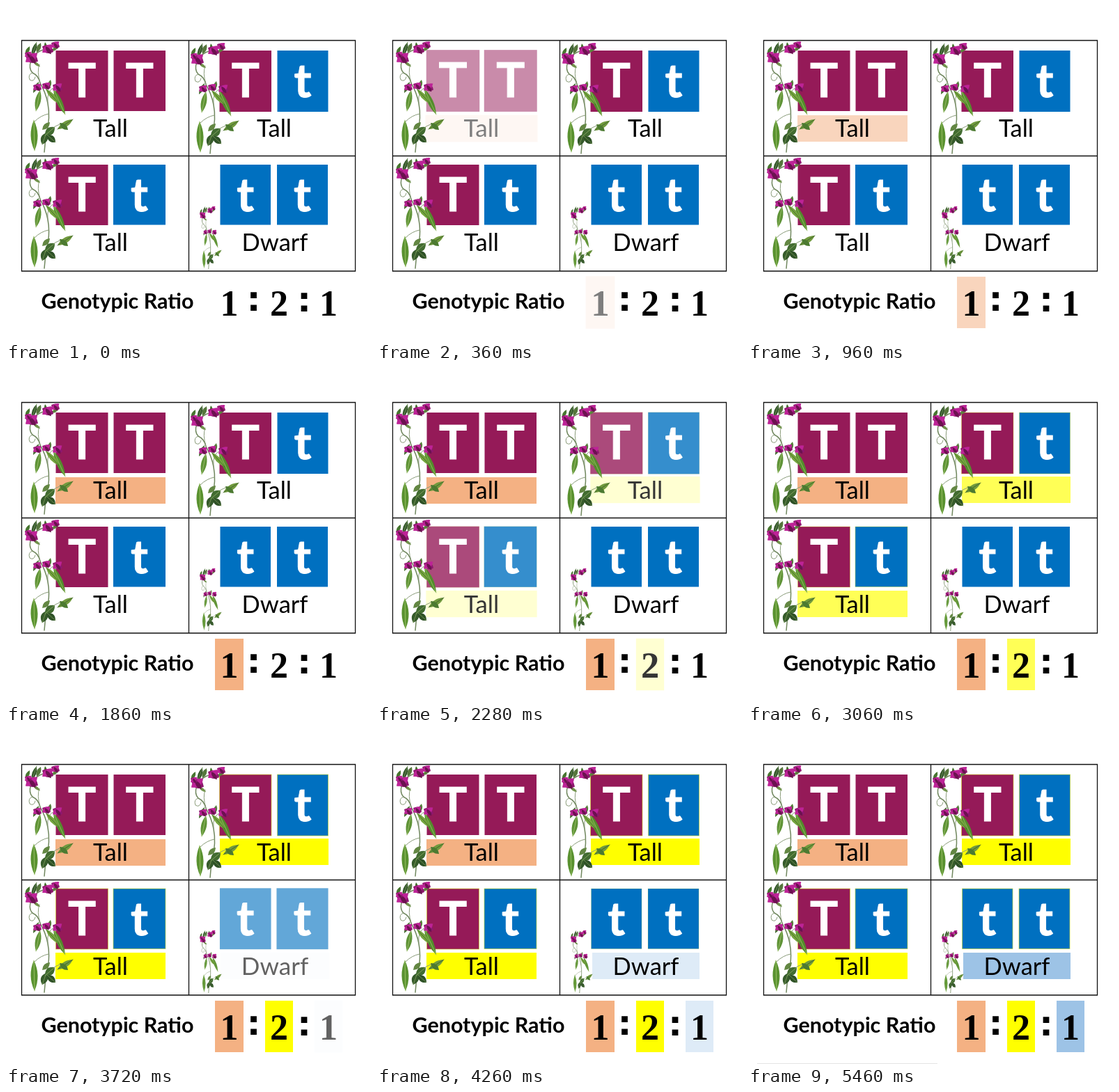
An HTML page that plays this animation: 524x480 px, repeating every 5.52 s.

```html
<!DOCTYPE html>
<html lang="en">
<head>
<meta charset="utf-8">
<title>Genotypic Ratio</title>
<style>
  html, body { margin: 0; width: 100%; height: 100%; overflow: hidden; background: #fff; }
  svg { display: block; width: 524px; height: 480px; }
  text { text-anchor: middle; }
  .allele { font: 700 67px Lato, sans-serif; fill: #fff; stroke: #fff; stroke-width: 1; }
  .trait { font: 400 34.5px Lato, sans-serif; }
  .title { font: 700 30.5px Lato, sans-serif; }
  .digit { font: 700 52px "Liberation Serif", serif; }
  .colon { font: 700 48px "Liberation Sans", sans-serif; stroke: #000; stroke-width: 2; }
</style>
</head>
<body>
<svg id="stage" viewBox="0 0 524 480">
  <path d="M22.5 49.5H501.5V381H22.5ZM262.5 49.5V381M22.5 215.5H501.5" fill="none" stroke="#111" stroke-width="1.3"/>
  <text class="title" x="160" y="435">Genotypic Ratio</text>
  <text class="colon" x="355.5" y="437">:</text>
  <text class="colon" x="428" y="438">:</text>
  <g id="parts"></g>
  <g id="plants"></g>
  <path id="rule" d="M13 479.5H272" stroke="#e4e4e4"/>
</svg>
<script>
const LOOP = 5520, STEP = 60, FADE = 1800, PULSE = 450;
const PURPLE = '#951a58', BLUE = '#0070c0';
const parts = document.getElementById('parts');
const plants = document.getElementById('plants');
const rule = document.getElementById('rule');

function add(parent, tag, attrs, content = '') {
  const el = document.createElementNS('http://www.w3.org/2000/svg', tag);
  for (const name in attrs) el.setAttribute(name, attrs[name]);
  el.textContent = content;
  return parent.appendChild(el);
}

// A box with centred text that can pulse as one piece.
function makePart([x, y, w, h], fill, cls, label, baseline) {
  const g = add(parts, 'g', {});
  const rect = add(g, 'rect', { x: -w / 2, y: -h / 2, width: w, height: h, fill });
  add(g, 'text', { class: cls, y: baseline - y - h / 2 }, label);
  return { g, rect, cx: x + w / 2, cy: y + h / 2 };
}

const tile = (box, label) =>
  makePart(box, label === 'T' ? PURPLE : BLUE, 'allele', label, box[1] + 66.5);

const groups = [
  { start: 0, color: '#f4b183', edge: 'none',
    tiles: [tile([71.5, 64, 75, 87], 'T'), tile([154.5, 64, 74.5, 87], 'T')],
    bands: [[[71, 157, 158, 38], 'trait', 'Tall', 188], [[300, 389, 41, 74], 'digit', '1', 445]] },
  { start: 1868, color: '#ffff00', edge: '#d4dc20',
    tiles: [tile([306.5, 64, 74.5, 88], 'T'), tile([389.5, 64, 73, 88], 't'),
            tile([71.5, 228, 75, 87], 'T'), tile([154, 228, 75, 86.5], 't')],
    bands: [[[307, 156, 156, 38], 'trait', 'Tall', 188], [[71, 320, 158, 38], 'trait', 'Tall', 352],
            [[372, 389, 40, 74], 'digit', '2', 445]] },
  { start: 3650, color: '#9dc3e6', edge: '#d4dc20',
    tiles: [tile([307.5, 228, 72.5, 86.5], 't'), tile([389, 228, 73, 86.5], 't')],
    bands: [[[309, 320, 154, 38], 'trait', 'Dwarf', 352], [[443, 389, 40, 74], 'digit', '1', 445]] }
];
for (const group of groups) {
  group.bands = group.bands.map(([box, cls, label, base]) => makePart(box, group.color, cls, label, base));
  for (const { rect } of group.tiles) rect.setAttribute('stroke', group.edge);
}

function drawPlant(transform) {
  const g = add(plants, 'g', { transform });
  const line = (d, stroke, width) =>
    add(g, 'path', { d, stroke, 'stroke-width': width, fill: 'none', 'stroke-linecap': 'round' });
  // Pointed leaf or pod between two tips.
  const lens = (x1, y1, x2, y2, width, fill, vein) => {
    const len = Math.hypot(x2 - x1, y2 - y1);
    const nx = (y1 - y2) / len * width, ny = (x2 - x1) / len * width;
    const mx = (x1 + x2) / 2, my = (y1 + y2) / 2;
    add(g, 'path', { fill, d: `M${x1} ${y1}Q${mx + nx} ${my + ny} ${x2} ${y2}Q${mx - nx} ${my - ny} ${x1} ${y1}` });
    if (vein) line(`M${x1} ${y1}L${x2} ${y2}`, vein, 0.8);
  };
  const flower = (x, y, r) => {
    lens(x - r, y - r * .5, x + r, y + r * .5, r * 1.5, '#8e176f');
    lens(x - r, y + r * .6, x + r * .9, y - r * .8, r * 1.2, '#bd2397');
    lens(x - r * .4, y - r * .5, x + r * .6, y + r * .9, r * .7, '#6b124f');
  };

  line('M55 210Q56 196 58 184Q64 160 60 140Q57 124 49 111Q47 100 38 96Q32 90 36 78Q41 66 56 62L72 56', '#71885f', 1.5);
  line('M49 110Q44 94 48 84M38 96Q31 98 34 106Q40 110 42 102M60 140Q58 120 70 117M58 185Q70 169 86 168M41 166Q50 157 61 155', '#8a9c7a', 1);

  lens(37, 72, 44, 52, 6, '#33552a', '#78985f');
  lens(44, 67, 50, 53, 6, '#55763c');
  lens(28, 70, 34, 58, 5, '#47752f');
  lens(58, 63, 56, 52, 4, '#45722d');
  lens(66, 65, 76, 56, 5, '#5c823d');
  lens(39, 80, 49, 87, 4, '#70934a');
  flower(37, 75, 9);
  flower(60, 62, 8);
  flower(71, 56, 6);
  flower(32, 70, 5);

  lens(68, 119, 85, 156, 8, '#548c2c', '#a0c56a');
  lens(57, 119, 76, 140, 7, '#76a53f', '#3c6525');
  lens(49, 121, 43, 151, 8, '#5f9337', '#a3c66f');
  lens(39, 125, 47, 109, 5, '#42692d');
  lens(61, 119, 64, 106, 5, '#547d39');
  flower(45, 117, 6);
  flower(58, 115, 6);
  flower(74, 117, 7);

  lens(40, 164, 41, 208, 10, '#5a9230', '#a6cb70');
  lens(58, 182, 52, 199, 10, '#365b2b', '#83a15e');
  lens(56, 186, 70, 174, 11, '#426c31', '#92ae6d');
  lens(59, 185, 71, 196, 9, '#2e5126', '#7b9b58');
  lens(52, 178, 63, 167, 7, '#638743');
  lens(74, 177, 96, 163, 8, '#719a3e', '#365b28');
  lens(77, 168, 89, 178, 7, '#4c7a31');
}
['translate(0 0)', 'translate(238 2)', 'translate(0 167)', 'translate(266 259) scale(.45 .565)'].forEach(drawPlant);

function pose({ g, cx, cy }, phase) {
  const active = phase > 0 && phase < 1;
  const scale = active ? 1 + 0.05 * (1 - Math.abs(2 * phase - 1)) : 1;
  const dip = active ? Math.min(phase / 0.2, 1, (1 - phase) / 0.2) : 0;
  g.setAttribute('transform', `translate(${cx} ${cy}) scale(${scale})`);
  g.setAttribute('opacity', 1 - dip / 2);
}

function render() {
  const time = Math.floor(performance.now() % LOOP / STEP) * STEP;
  for (const { start, tiles, bands } of groups) {
    const progress = Math.max(0, Math.min(1, (time - start) / FADE));
    const phase = (time - start) / PULSE;
    for (const part of tiles) {
      pose(part, phase);
      part.rect.setAttribute('stroke-opacity', progress * 0.6);
    }
    for (const part of bands) {
      pose(part, phase);
      part.rect.setAttribute('fill-opacity', progress);
    }
  }
  rule.setAttribute('visibility', time >= 5460 ? 'visible' : 'hidden');
  requestAnimationFrame(render);
}
render();
</script>
</body>
</html>
```
